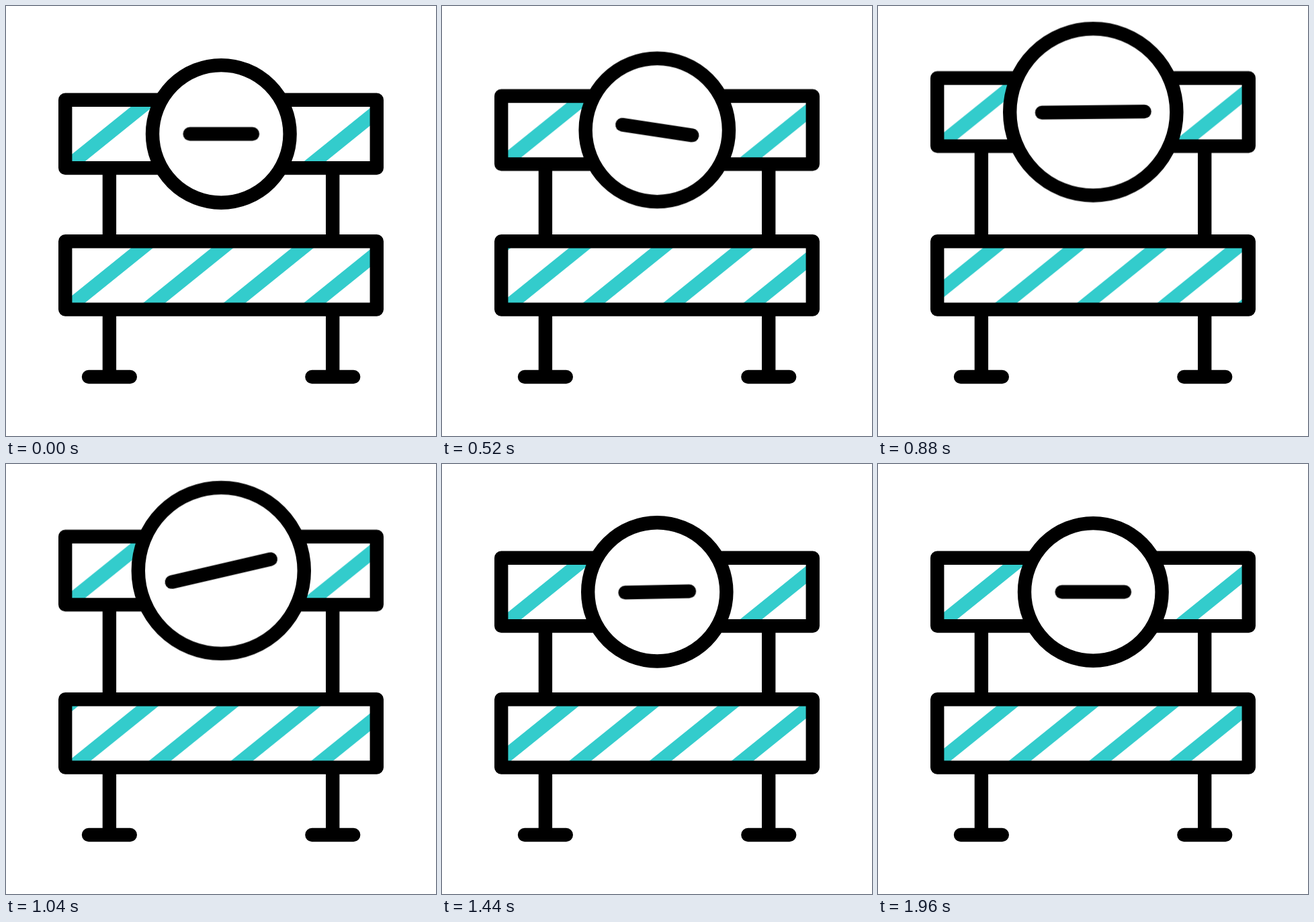
Write an HTML page that moves like this. It is 640 px wide and 640 px high and loops after 2000 ms.

```html
<!DOCTYPE html>
<html lang="en">
<head>
<meta charset="utf-8">
<title>Road barrier</title>
<style>
  html, body { margin: 0; width: 100%; height: 100%; overflow: hidden; background: #fff; }
  svg { display: block; width: 100vw; height: 100vh; }

  .ink { fill: none; stroke: #000; stroke-width: 20.4; stroke-linecap: round; stroke-linejoin: round; }
  .white { fill: #fff; }
  .stripe { fill: none; stroke: #3cc; stroke-width: 20.5; }

  .belt { animation: slide 2s steps(50) -8ms infinite; }
  .lift, .disc, .tilt, .bar { animation: 2s cubic-bezier(.333, 0, .667, 1) infinite; }
  .lift { animation-name: lift; }
  .disc { r: 102.3px; animation-name: grow; }
  .tilt { animation-name: tilt; }
  .bar { x: -56.8px; width: 113.6px; animation-name: stretch; }

  @keyframes slide {
    to { transform: translateX(480.5px); }
  }
  @keyframes lift {
    0%, 20%, 72%, 100% { transform: translateY(0); }
    42.5%, 50% { transform: translateY(-32.5px); }
  }
  @keyframes grow {
    0%, 20%, 75%, 100% { r: 102.3px; }
    41%, 49.5% { r: 124.1px; }
  }
  @keyframes stretch {
    0%, 20%, 75%, 100% { x: -56.8px; width: 113.6px; }
    41%, 49.5% { x: -86.5px; width: 173px; }
  }
  @keyframes tilt {
    0%, 20%, 75%, 100% { transform: rotate(0deg); }
    31% { transform: rotate(15deg); }
    57% { transform: rotate(-16deg); }
  }
</style>
</head>
<body>
<svg viewBox="0 0 640 640">
  <defs>
    <rect id="board" x="88.2" y="350.2" width="463.6" height="101.4"/>
    <clipPath id="inside"><use href="#board"/></clipPath>
    <path id="stripe" class="stripe" d="M227.5 340l-151.3 122"/>
    <g id="stripes">
      <use href="#stripe"/>
      <use href="#stripe" x="119.5"/>
      <use href="#stripe" x="239"/>
      <use href="#stripe" x="358.5"/>
    </g>
  </defs>

  <!-- raised board with its posts and sign -->
  <g class="lift">
    <path class="ink" d="M153.9 241V395M486.2 241V395"/>
    <g transform="translate(0 -210.5)">
      <use href="#board" class="white"/>
      <g clip-path="url(#inside)">
        <use href="#stripe"/>
        <use href="#stripe" x="358.5"/>
      </g>
      <use href="#board" class="ink"/>
    </g>
    <g transform="translate(320.3 190.4)">
      <circle class="ink disc" style="fill:#fff"/>
      <g class="tilt">
        <rect class="bar" y="-10.2" height="20.4" rx="10.2"/>
      </g>
    </g>
  </g>

  <!-- fixed lower board and feet -->
  <path class="ink" d="M153.9 452V552M486.2 452V552M123 552H184.8M455.4 552H517.2"/>
  <use href="#board" class="white"/>
  <g clip-path="url(#inside)">
    <g class="belt">
      <use href="#stripes"/>
      <use href="#stripes" x="-480.5"/>
    </g>
  </g>
  <use href="#board" class="ink"/>
</svg>
</body>
</html>
```
